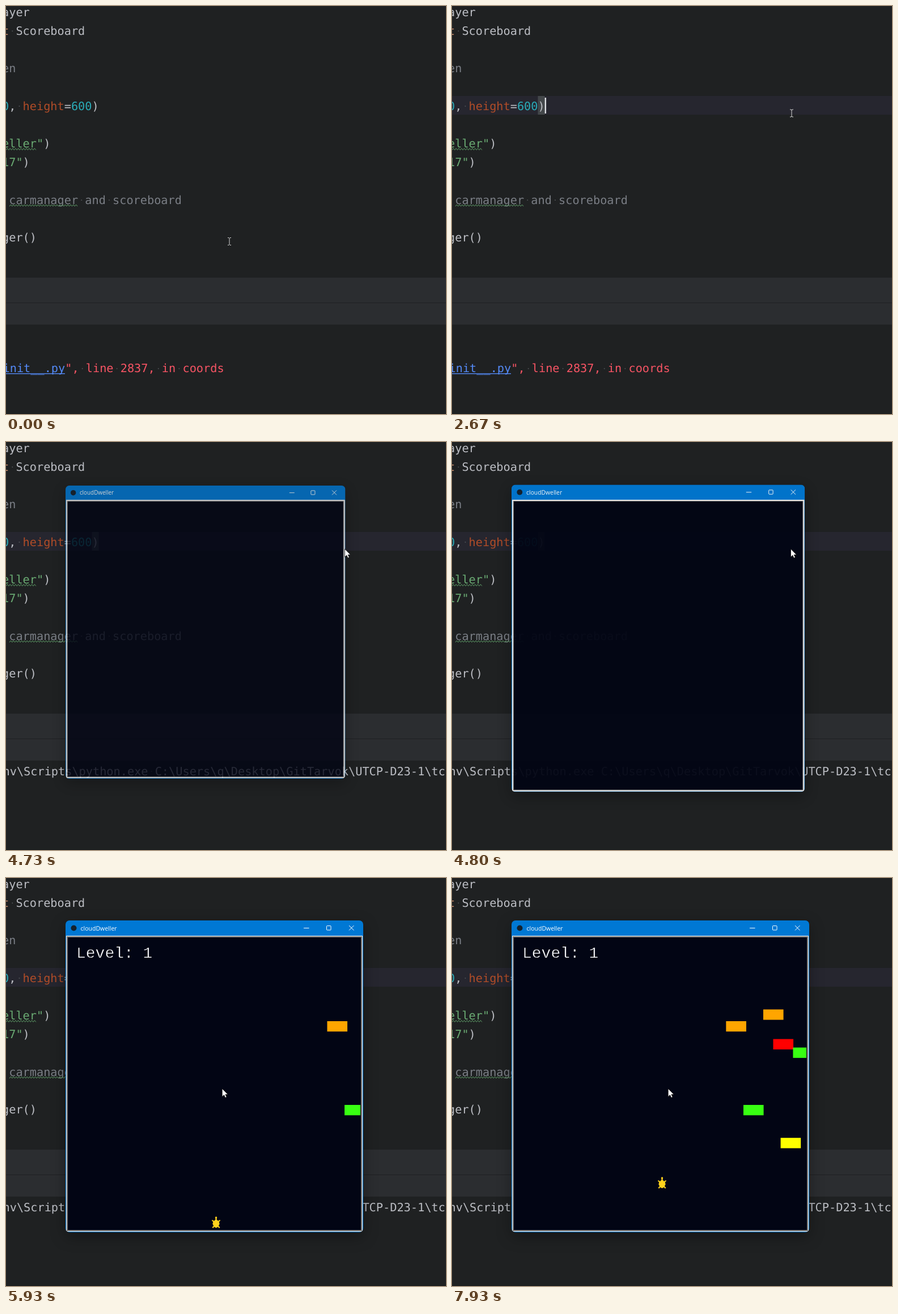
These frames come from a looping animation (776 px wide and 721 px high, 8000 ms). An HTML page:

```html
<!DOCTYPE html>
<html lang="en">
<head>
<meta charset="utf-8">
<title>Editor and turtle game</title>
<style>
  html, body { margin: 0; width: 100%; height: 100%; overflow: hidden; background: #1f2122; }
  #stage { position: absolute; left: 0; top: 0; width: 776px; height: 721px; overflow: hidden; }
  svg { position: absolute; left: 0; top: 0; display: block; }
  .code text { font: 20.25px "DejaVu Sans Mono", monospace; text-rendering: geometricPrecision; white-space: pre; }
  #win {
    position: absolute; left: 105px; top: 75px; width: 525px; height: 551px;
    border-radius: 7px; overflow: hidden; transform-origin: 0 0;
    box-shadow: 0 8px 26px rgba(0, 0, 0, .34);
  }
  .title { font: 10.5px "Open Sans", "Noto Sans", sans-serif; fill: #fff; }
  .level { font: 28px "Liberation Mono", monospace; fill: #fff; stroke: #020514; stroke-width: .5; white-space: pre; }
</style>
</head>
<body>
<div id="stage">
  <svg class="code" width="776" height="721">
    <rect width="776" height="721" fill="#1f2122"/>
    <g id="focus">
      <rect width="776" height="33" fill="#26262f"/>
      <rect id="match" width="12.2" height="33" fill="#43474a"/>
    </g>
    <rect y="480" width="776" height="83" fill="#2b2d30"/>
    <rect y="524" width="776" height="1" fill="#1f2023"/>
    <rect y="720" width="776" height="1" fill="#18191b"/>
    <g id="editor"></g>
    <g id="trace"></g>
    <g id="command"></g>
    <rect id="caret" width="2.4" height="28" fill="#dfe1e5"/>
  </svg>

  <div id="win">
    <svg width="525" height="551" viewBox="105 75 525 551">
      <rect x="105" y="75" width="525" height="551" fill="#0078d4"/>
      <circle cx="119.5" cy="88.5" r="5" fill="#14222f"/>
      <text class="title" x="131.5" y="92.5">cloudDweller</text>
      <g fill="none" stroke="#fff">
        <path d="M525 88.5h9.5M605 84l8.5 8.5M613.5 84l-8.5 8.5"/>
        <rect x="565.5" y="84.5" width="7.5" height="7.5" rx=".8"/>
      </g>
      <rect x="106" y="102" width="523" height="523" fill="#f0f0f0"/>
      <rect x="107" y="103" width="521" height="521" fill="#767676"/>
      <rect x="109" y="105" width="517" height="517" fill="#020514"/>
      <rect id="edge" x="107" y="103" width="521" height="521" fill="none" stroke="#f0f0f0" stroke-width="2"/>
      <g id="game">
        <text class="level" x="124" y="141">Level: 1</text>
        <clipPath id="field"><rect x="109" y="105" width="516" height="517"/></clipPath>
        <g id="cars" clip-path="url(#field)"></g>
        <path id="turtle" fill="#ffd21c"/>
      </g>
    </svg>
  </div>

  <svg width="776" height="721">
    <g id="pointer">
      <path id="beam" fill="none" stroke="#d6d6d6" d="M-3-6.5h2l1 1 1-1h2M0-5.5v11M-3 6.5h2l1-1 1 1h2"/>
      <path id="arrow" fill="#fff" stroke="#000" stroke-width=".7" d="M-1.5-.5v14.2l3.3-3 2.2 4.8 2.4-1-2.2-4.7h4.4z"/>
    </g>
  </svg>
</div>

<script>
const LOOP = 8000, FPS = 15, CELL = 12.19, ROW = 33.2, STEP = 4.375;
const OPEN = 4733, PLAY = 4933;
const $ = id => document.getElementById(id);

function add(parent, tag, attrs, text) {
  const el = document.createElementNS("http://www.w3.org/2000/svg", tag);
  for (const k in attrs) el.setAttribute(k, attrs[k]);
  if (text) el.textContent = text;
  parent.append(el);
  return el;
}

// Sets coloured runs on the character grid; spaces get a faint dot.
function line(parent, x, y, ...runs) {
  let col = 0;
  for (const [text, fill] of runs) {
    for (const part of text.split(/( )/)) {
      const px = x + col * CELL;
      if (part === " ") add(parent, "circle", { cx: px + CELL / 2, cy: y - 6.6, r: 1, fill: "#505357" });
      else if (part) add(parent, "text", { x: px, y, fill }, part);
      col += part.length;
    }
  }
}

function wave(x, end, y) {
  let d = `M${x} ${y}`;
  while (x < end) d += `L${x + 2.4} ${y - 3}L${x += 4.8} ${y}`;
  add($("editor"), "path", { d, fill: "none", stroke: "#5f9f68" });
}

const PLAIN = "#bcbec4", GREY = "#7a7e85", GREEN = "#6aab73", TEAL = "#2aacb8", RED = "#f75464", BLUE = "#548af7";
const rowTop = row => row * ROW - 7;
const code = (row, ...runs) => line($("editor"), -7, rowTop(row) + 24.6, ...runs);

code(0, ["ayer", PLAIN]);
code(1, ["t ", "#cf8e6d"], ["Scoreboard", PLAIN]);
code(3, ["en", GREY]);
code(5, ["0", TEAL], [", ", PLAIN], ["height", "#b04c28"], ["=", PLAIN], ["600", TEAL], [")", PLAIN]);
code(7, ["eller\"", GREEN], [")", PLAIN]);
code(8, ["17\"", GREEN], [")", PLAIN]);
code(10, [" carmanager and scoreboard", GREY]);
code(12, ["ger()", PLAIN]);
wave(0, 52, 254.5);
wave(6, 125, 354);

line($("trace"), -5.5, 647.3, ["init__.py", BLUE], ["\", line 2837, in coords", RED]);
add($("trace"), "rect", { y: 649, width: 104, height: 1.4, fill: BLUE });
line($("command"), -5.5, 588.6, [String.raw`nv\Scripts\python.exe C:\Users\q\Desktop\GitTarvok\UTCP-D23-1\tc`, PLAIN]);

// Right half of the turtle outline, mirrored for the left.
const half = [[0, 16], [2, 14], [1, 10], [4, 7], [7, 9], [9, 8], [6, 5], [7, 1], [5, -3], [8, -6], [6, -8], [4, -5], [0, -7]];
const outline = half.concat(half.slice(1, -1).reverse().map(([x, y]) => [-x, y]));
$("turtle").setAttribute("d", "M" + outline.map(([x, y]) => [x * .875, -y * .875]).join("L") + "z");

// Cars: top edge, colour, game tick of entry.
const cars = [
  [253, "#ffa500", 0], [401, "#38ff12", 7], [232.3, "#ffa500", 15],
  [284.6, "#ff0000", 19], [459.2, "#ffff00", 22], [299.6, "#38ff12", 27]
].map(([y, fill, born]) => ({ born, el: add($("cars"), "rect", { y, fill, width: 35.6, height: 18.3 }) }));

// Pointer glides: start, end, x, y.
const glides = [[0, 66, 394, 415], [1130, 1600, 757, 220], [1600, 1733, 732, 236], [2333, 2667, 599, 189.5], [5333, 5933, 382.7, 372.7]];

const ramp = (t, from, to) => Math.min(1, Math.max(0, (t - from) / (to - from)));
const smooth = k => k * k * (3 - 2 * k);
const count = (t, from, every) => Math.max(0, Math.floor((t - from) / every));
const show = (el, on) => { el.style.display = on ? "" : "none"; };
const move = (el, x, y) => el.setAttribute("transform", `translate(${x} ${y})`);

function drawEditor(t) {
  show($("trace"), t < 4400);
  show($("command"), t >= 4400);

  const [row, col] = t < 2667 ? [7, 7] : [5, 14];
  const x = col * CELL - 7;
  const blinkOff = t >= 3400 && t < 3930;
  move($("focus"), 0, rowTop(row));
  $("match").setAttribute("x", x - CELL);
  move($("caret"), x, rowTop(row) + 3);
  show($("focus"), t >= 1930);
  show($("caret"), t >= 1930 && t < OPEN && !blinkOff);
}

function drawWindow(t) {
  const left = (1 - ramp(t, OPEN, OPEN + 133)) ** 2;
  $("win").style.transform = `translateY(${2 * left}px) scale(${1 - .06 * left})`;
  $("win").style.opacity = 1 - .2 * left;
  show($("win"), t >= OPEN);
  show($("edge"), t < PLAY);
  show($("game"), t >= PLAY);

  const tick = count(t, 4840, 104);
  for (const { born, el } of cars) {
    show(el, tick >= born);
    el.setAttribute("x", 610.2 - (tick - born) * STEP);
  }
  move($("turtle"), 370.5, 612 - count(t, 6490, 90) * STEP);
}

function drawPointer(t) {
  let x = 394, y = 416;
  for (const [from, to, toX, toY] of glides) {
    const k = smooth(ramp(t, from, to));
    x += (toX - x) * k;
    y += (toY - y) * k;
  }
  move($("pointer"), x, y);
  show($("beam"), t < OPEN);
  show($("arrow"), t >= OPEN);
}

function draw(ms) {
  const t = Math.round(Math.floor((ms + 4) * FPS / 1000) * 1000 / FPS);
  drawEditor(t);
  drawWindow(t);
  drawPointer(t);
}

const start = performance.now();
function loop() {
  draw((performance.now() - start) % LOOP);
  requestAnimationFrame(loop);
}
draw(0);
requestAnimationFrame(loop);
</script>
</body>
</html>
```
